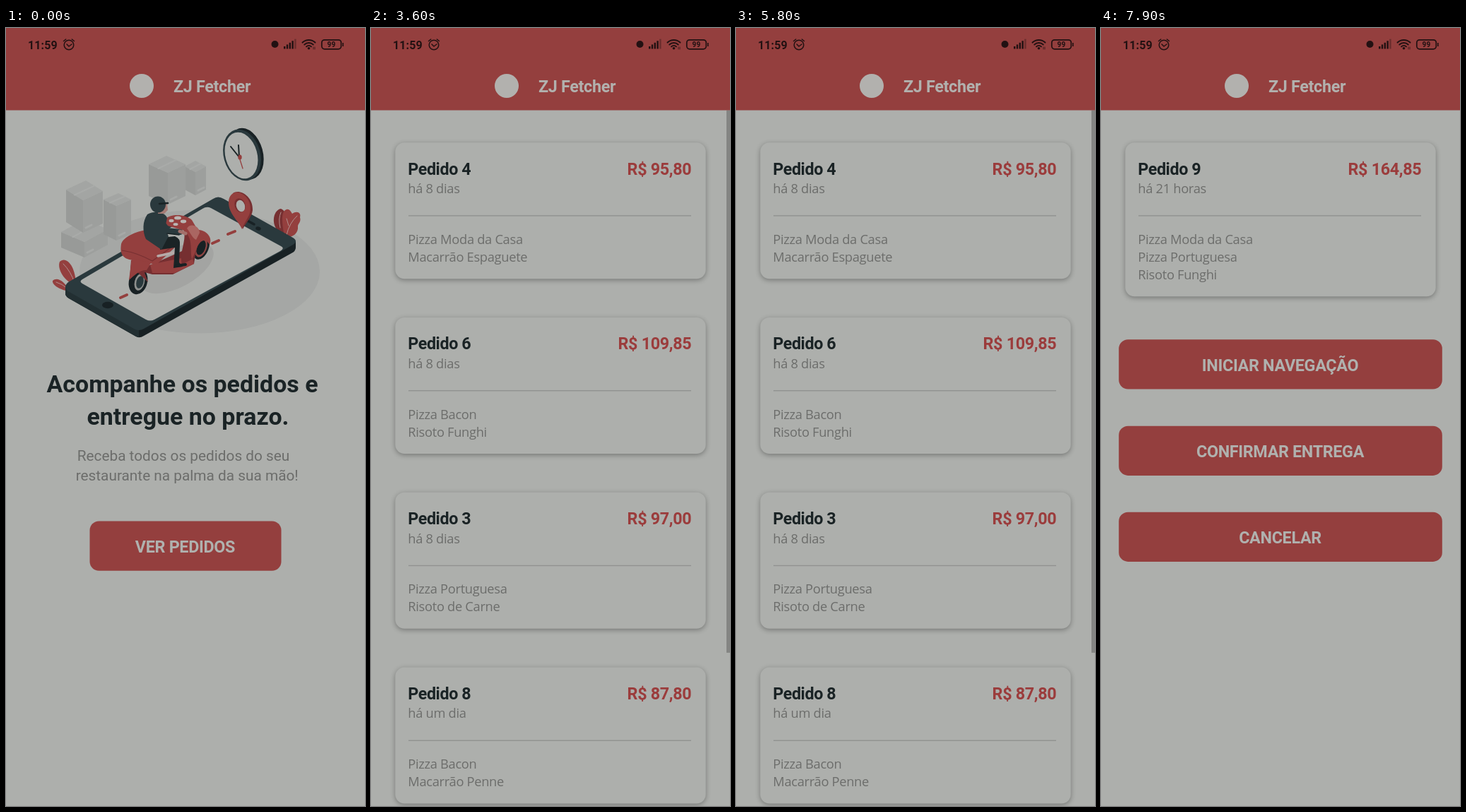
These frames come from a looping animation (508 px wide and 1102 px high, 8000 ms). An HTML page with a canvas:

```html
<!DOCTYPE html>
<html lang="pt-BR">
<head>
<meta charset="utf-8">
<title>Entregas</title>
<style>
  html, body { margin: 0; width: 100%; height: 100%; overflow: hidden; background: #adafac; }
  canvas { display: block; }
</style>
</head>
<body>
<canvas id="stage" width="508" height="1102"></canvas>
<script>
const W = 508, H = 1102, LOOP = 8000, STEP = 100, HEAD = 116.5;
const ctx = document.getElementById('stage').getContext('2d');
const PAPER = '#adafac', RED = '#943f3e', DEEP = '#762f31', INK = '#1a2325',
      SLATE = '#2a393d', DARK = '#182124', GREY = '#6c6d6b', STATUS = '#221112';
const BOLD = '700 23.3px Roboto, sans-serif';
const BODY = '400 18.3px "Open Sans", sans-serif';
const MAX_SCROLL = 278.4;

const orders = [
  ['Pedido 4', 'há 8 dias', 'R$ 95,80', ['Pizza Moda da Casa', 'Macarrão Espaguete']],
  ['Pedido 6', 'há 8 dias', 'R$ 109,85', ['Pizza Bacon', 'Risoto Funghi']],
  ['Pedido 3', 'há 8 dias', 'R$ 97,00', ['Pizza Portuguesa', 'Risoto de Carne']],
  ['Pedido 8', 'há um dia', 'R$ 87,80', ['Pizza Bacon', 'Macarrão Penne']],
  ['Pedido 9', 'há 21 horas', 'R$ 164,85', ['Pizza Moda da Casa', 'Pizza Portuguesa', 'Risoto Funghi']]
];

const clamp = v => Math.max(0, Math.min(1, v));
const span = (t, from, to) => clamp((t - from) / (to - from));
const inOut = p => p < 0.5 ? 2 * p * p : 1 - 2 * (1 - p) ** 2;

// Critically damped spring used by the screen push
function push(t, start) {
  const u = Math.max(0, t - start) * 0.01826;
  return 1 - (1 + u) * Math.exp(-u);
}

function text(str, x, y, font, color, align = 'left', gap = -0.31) {
  ctx.font = font;
  ctx.letterSpacing = gap + 'px';
  ctx.textAlign = align;
  ctx.fillStyle = color;
  ctx.fillText(str, x, y);
}

function rect(x, y, w, h, color) {
  ctx.fillStyle = color;
  ctx.fillRect(x, y, w, h);
}

function round(x, y, w, h, r, color) {
  ctx.beginPath();
  ctx.roundRect(x, y, w, h, r);
  ctx.fillStyle = color;
  ctx.fill();
}

function fill(d, color) {
  ctx.fillStyle = color;
  ctx.fill(new Path2D(d));
}

function line(d, color, width = 1) {
  ctx.strokeStyle = color;
  ctx.lineWidth = width;
  ctx.lineCap = ctx.lineJoin = 'round';
  ctx.stroke(new Path2D(d));
}

function oval(x, y, rx, ry, tilt, color) {
  ctx.beginPath();
  ctx.ellipse(x, y, rx, ry, tilt, 0, 7);
  ctx.fillStyle = color;
  ctx.fill();
}

// Isometric carton: left corner, two top edges and the height
function carton(x, y, a, b, depthA, depthB, h) {
  const mx = x + a, my = y + depthA, rx = mx + b, ry = my - depthB;
  fill(`M${x} ${y}L${mx} ${my}V${my + h}L${x} ${y + h}Z`, '#989a98');
  fill(`M${mx} ${my}L${rx} ${ry}V${ry + h}L${mx} ${my + h}Z`, '#9d9f9d');
  fill(`M${x} ${y}L${mx} ${my}L${rx} ${ry}L${x + b} ${y - depthB}Z`, '#a3a5a3');
  line(`M${x + a / 2} ${y + depthA / 2}l${b} ${-depthB}`, '#a9aba9', 2);
  line(`M${mx + 4} ${my + h - 7}l8 -4`, '#a7a9a7', 3);
}

function clock() {
  oval(339.5, 178, 24, 37, -0.27, DARK);
  oval(334, 180, 26, 37, -0.27, SLATE);
  oval(333, 180.5, 22.5, 33.5, -0.27, PAPER);
  line('M330 183L329 166M330 183L318 168', INK, 2);
  line('M330 183L335 199', RED, 1.3);
  oval(331, 183, 2.7, 3.5, 0, RED);
}

function leaves() {
  fill('M99 365C82 359 72 341 76 331C85 322 99 337 99 365Z', RED);
  fill('M90 373C76 371 65 364 66 358C72 352 83 358 90 373Z', RED);
  line('M97 361Q92 345 81 334M87 369Q79 362 71 360', '#b1908e', 1);
  fill('M389 291C374 282 377 258 389 256C400 260 397 281 393 292Z', DEEP);
  fill('M394 295C391 278 388 260 397 257C401 256 403 260 405 263C412 258 418 262 416 268'
    + 'C418 275 413 277 413 281C414 290 407 297 394 297Z', RED);
  line('M388 283Q385 270 389 261M397 293Q401 276 412 266M400 280L397 270', '#b1908e', 1);
}

function phone() {
  fill('M84 366V376Q84 380 89 383L184 437Q189 440 195 436L404 319Q410 316 410 311V302L188 425Z', DARK);
  fill('M84 366V376Q84 380 89 383L184 437L188 438V424Z', '#222f32');
  fill('M88 360L293 242Q300 237 308 242L406 297Q414 302 406 307L195 426Q188 430 181 426L88 373Q80 367 88 360Z', SLATE);
  fill('M108 356L278 256Q284 252 290 255L389 309Q395 312 388 316L210 413Q204 416 198 413L108 362Q103 359 108 356Z', PAPER);
  oval(144, 392.5, 8, 4.7, 0, DARK);
  line('M340 272L351 278', DARK, 3.5);
  oval(357, 284, 3.8, 2.5, 0.2, DARK);
  ctx.lineCap = 'butt';
  line('M162 382L171 378M292 305L301 301M314 292L324 288', RED, 4);
}

function pin() {
  fill('M321 234C330 227 350 238 349 258C348 268 339 276 335 285Z', DEEP);
  fill('M334 285C329 273 315 263 315 247C315 233 327 229 336 236C346 243 348 256 344 265C340 273 336 278 334 285Z', RED);
  oval(331, 251, 7.5, 10, -0.3, DEEP);
  oval(332, 252, 6, 8.5, -0.3, PAPER);
}

function scooter() {
  oval(242, 340, 57, 27, -0.5, '#a3a4a2');
  // Wheels
  oval(276, 310, 11, 18.5, 0.35, DARK);
  oval(276, 311, 8, 14, 0.35, '#8f4644');
  oval(276, 311, 6, 11, 0.35, DARK);
  oval(187, 359, 13, 18.5, 0.25, DARK);
  oval(189, 360, 7, 12, 0.25, '#8d8f8d');
  oval(189.5, 360, 5, 9, 0.25, SLATE);
  // Chassis and rear body
  fill('M177 329L204 336L249 316L269 314L266 334L236 349L207 349L196 346L201 360L186 346L175 356Z', DEEP);
  fill('M163 306C166 296 184 288 199 286L226 300L241 309L213 335L180 329C164 327 161 319 163 306Z', RED);
  fill('M178 326L205 333L199 343C190 342 182 350 174 357Z', RED);
  fill('M204 335L263 323L266 334L239 347L207 347Z', RED);
  line('M164 315Q185 318 207 330L236 309', DEEP, 1.2);
  line('M215 323L238 318', '#b6aaa8', 3.5);
  // Front shield and handlebar
  fill('M252 287C259 280 270 283 276 292L266 326L249 335C245 317 255 304 252 287Z', DEEP);
  fill('M226 270C234 263 253 263 263 272L270 284L259 289L225 279Z', RED);
  fill('M251 286C253 277 268 277 273 286C284 287 293 297 288 307C282 296 273 301 269 315L263 328C260 314 266 299 251 286Z', RED);
  fill('M256 284C260 276 273 279 274 290L269 300C264 298 261 290 256 284Z', '#aa6662');
  oval(234, 273, 3.5, 2.2, 0, '#bab5b2');
  oval(243, 269, 5, 2.5, 0, '#bab5b2');
  oval(251, 274, 4.2, 2.4, 0, '#bab5b2');
  oval(240, 278, 3.5, 2, 0, '#bab5b2');
  // Rider
  fill('M219 297L239 295Q247 298 246 307L245 332L250 338L237 340L239 311L218 314Z', INK);
  fill('M200 264C211 258 225 261 228 269L225 283L230 295L220 314L198 299C193 288 193 274 200 264Z', SLATE);
  line('M219 273L229 287L246 289', SLATE, 8);
  line('M228 291L245 293', INK, 1.5);
  line('M246 288L254 291', '#a3706b', 5);
  line('M240 337L254 335', DARK, 4);
  fill('M216 253L228 249L229 258L224 263L215 263Z', '#a47b75');
  oval(215, 250, 11, 11.5, 0, SLATE);
  line('M217 249L229 248', INK, 2.5);
}

function scene() {
  oval(274, 345, 170, 87.5, 0, '#a5a7a5');
  carton(78, 289, 33, 33, 14, 18, 22);
  carton(85, 229, 24, 28, 15, 13, 46);
  carton(138, 243, 18, 21, 9, 9, 49);
  carton(253, 196, 15, 15, 8, 8, 33);
  carton(202, 193, 27, 25, 12, 12, 45);
  clock();
  leaves();
  phone();
  pin();
  scooter();
}

function header() {
  rect(0, 0, W, HEAD, RED);
  oval(192, 82, 17, 17, 0, '#b2b1ae');
  text('ZJ Fetcher', 237, 90.5, BOLD, '#b2b1ae');
}

function button(label, x, y, w) {
  round(x, y, w, 70.2, 13, RED);
  text(label, x + w / 2 - 0.5, y + 44.4, BOLD, '#b0b1ae', 'center');
}

function card([name, age, price, items], y) {
  const h = 143 + items.length * 25;
  ctx.save();
  ctx.shadowColor = 'rgba(0,0,0,.32)';
  ctx.shadowBlur = 7;
  ctx.shadowOffsetY = 2;
  round(34.3, y, 439.4, h, 13, PAPER);
  ctx.restore();
  text(name, 52.2, y + 45.3, BOLD, INK, 'left', -0.4);
  text(price, 453.3, y + 45.3, BOLD, '#9b3c3c', 'right');
  text(age, 52.3, y + 71.7, BODY, GREY);
  rect(53, y + 103, 400, 1.4, '#909290');
  items.forEach((item, i) => text(item, 52.3, y + 143.5 + i * 25, BODY, GREY));
}

function home(t) {
  scene();
  const title = '700 33.9px Roboto, sans-serif', sub = '400 20.8px Roboto, sans-serif';
  text('Acompanhe os pedidos e', 57.5, 515.5, title, INK, 'left', 0);
  text('entregue no prazo.', 114.5, 561.5, title, INK, 'left', 0);
  text('Receba todos os pedidos do seu', 100.7, 612.5, sub, GREY, 'left', 0);
  text('restaurante na palma da sua mão!', 98.7, 641, sub, GREY, 'left', 0);
  const press = inOut(span(t, 2050, 2200)) - inOut(span(t, 2217, 2467));
  ctx.globalAlpha = 1 - 0.8 * press;
  button('VER PEDIDOS', 118.5, 698.5, 271);
  ctx.globalAlpha = 1;
}

function scrollAt(t) {
  const glide = (from, to) => 1 - (1 - span(t, from, to)) ** 2;
  return MAX_SCROLL * (glide(3850, 4450) - glide(5050, 5600) + glide(5850, 6250));
}

function barAlpha(t) {
  if (t < 4750) return 1;
  if (t < 5050) return 1 - span(t, 4750, 5000);
  return 1 - span(t, 6550, 6800);
}

function list(t) {
  if (t < 3000) return;
  const scroll = scrollAt(t), view = H - HEAD, ratio = view / (view + MAX_SCROLL);
  orders.forEach((order, i) => card(order, 162.2 + i * 247.8 - scroll));
  rect(503, HEAD + scroll * ratio, 5, view * ratio, `rgba(0,0,0,${0.24 * barAlpha(t)})`);
}

function detail() {
  card(orders[4], 162.2);
  button('INICIAR NAVEGAÇÃO', 25.2, 441.3, 457.6);
  button('CONFIRMAR ENTREGA', 25.2, 563.7, 457.6);
  button('CANCELAR', 25.2, 685.7, 457.6);
}

function screen(body, t, x) {
  ctx.save();
  ctx.translate(x, 0);
  ctx.beginPath();
  ctx.rect(0, 0, W, H);
  ctx.clip();
  rect(0, 0, W, H, PAPER);
  body(t);
  header();
  ctx.restore();
}

function slide(from, to, t, start) {
  const p = push(t, start), x = Math.round(W * (1 - p));
  screen(from, t, -0.3 * (W - x));
  screen(to, t, x);
  if (x > 0) rect(x, 0, 1, HEAD, 'rgba(255,255,255,.1)');
}

function statusBar() {
  text('11:59', 31, 29.5, '700 16px Roboto, sans-serif', STATUS, 'left', 0.1);
  line('M95.8 24a6.8 6.8 0 1 0 -13.6 0a6.8 6.8 0 1 0 13.6 0M86 23l3 3l4 -3M81.5 18.5l3.2 -2.5M96.5 18.5l-3.2 -2.5', STATUS, 1.5);
  oval(380.5, 23, 5, 5, 0, STATUS);
  for (let i = 0; i < 5; i++) {
    const h = 3.5 + i * 2.6;
    rect(393 + i * 3.8, 29.5 - h, 2.4, h, i < 4 ? STATUS : 'rgba(34,17,18,.35)');
  }
  for (const r of [5, 9, 13]) {
    ctx.beginPath();
    ctx.arc(428.5, 30, r, -2.33, -0.81);
    ctx.strokeStyle = STATUS;
    ctx.lineWidth = 2;
    ctx.stroke();
  }
  oval(428.5, 28.8, 1.8, 1.8, 0, STATUS);
  line('M435 27v3M437 27v3', STATUS, 0.7);
  ctx.beginPath();
  ctx.roundRect(446.8, 16.8, 27.5, 13, 4);
  ctx.strokeStyle = STATUS;
  ctx.lineWidth = 1.7;
  ctx.stroke();
  rect(476, 21, 1.6, 5, STATUS);
  text('99', 460.5, 27, '700 10px Roboto, sans-serif', STATUS, 'center', 0.2);
}

function draw(now) {
  const t = Math.floor((now % LOOP) / STEP) * STEP;
  if (t < 2204.3) screen(home, t, 0);
  else if (t < 2900) slide(home, list, t, 2204.3);
  else if (t < 7266) screen(list, t, 0);
  else slide(list, detail, t, 7266);
  statusBar();
}

const begin = performance.now();
function tick() {
  draw(performance.now() - begin);
  requestAnimationFrame(tick);
}
tick();
</script>
</body>
</html>
```
